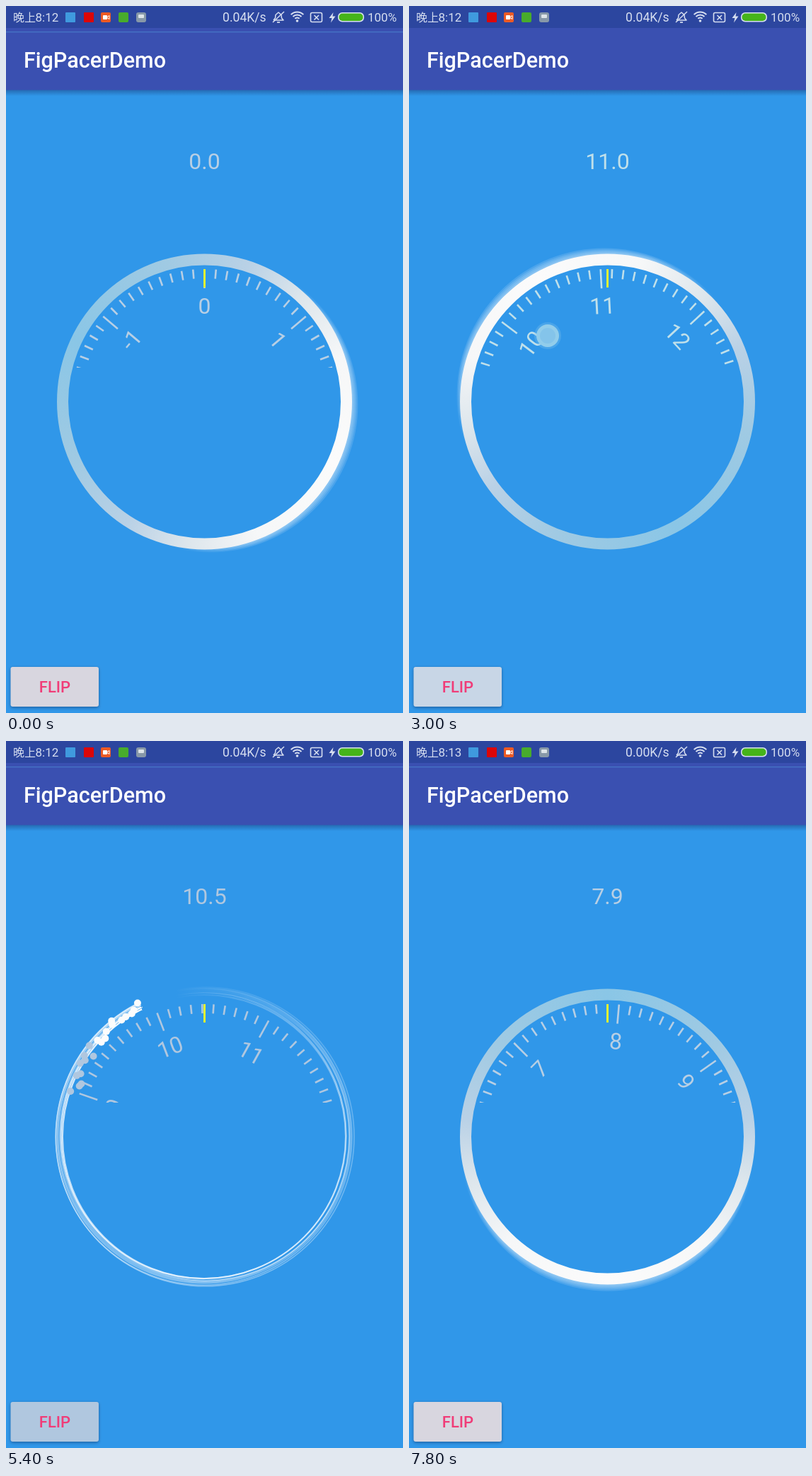
Animation, 561 px wide and 997 px high, one loop 8 s. Source, as an HTML page with a canvas:

```html
<!DOCTYPE html>
<html lang="zh">
<head>
<meta charset="utf-8">
<title>Dial</title>
<style>
html, body { margin: 0; width: 100%; height: 100%; overflow: hidden; background: #3097e9; }
canvas { display: block; width: 561px; height: 997px; }
</style>
</head>
<body>
<canvas id="stage" width="561" height="997"></canvas>
<script>
const ctx = document.getElementById('stage').getContext('2d');
const LOOP = 8000, STEP = 200;
const CX = 280.5, CY = 558, RAD = Math.PI / 180;
const ROBOTO = 'Roboto, sans-serif';
const CJK = '"Noto Sans CJK SC", "Noto Sans CJK", sans-serif';
const SPARK_START = 4700, SPARK_END = 7200;

// time, dial value
const DRAG = [[0, 0], [400, 0], [1800, 7.82], [2600, 9], [3000, 11.06],
  [4000, 21.68], [4400, 22.8], [5400, 10.42], [6200, 7.9], [LOOP, 7.9]];

function dialAt(t) {
  const i = DRAG.findIndex(k => k[0] > t);
  const [t0, v0] = DRAG[i - 1], [t1, v1] = DRAG[i];
  const value = v0 + (v1 - v0) * (t - t0) / (t1 - t0);
  // the readout trails the dial by up to a tenth
  const shown = v1 > v0 ? Math.floor(value * 10 + 1e-6) : Math.ceil(value * 10 - 1e-6);
  return { value, shown: (shown / 10).toFixed(1) };
}

function seeded(seed) {
  let s = seed * 7919 + 17;
  return () => {
    s = (s * 16807) % 2147483647;
    return s / 2147483647;
  };
}

function toneAt(t) {
  if (t >= SPARK_START && t < SPARK_END) return { ink: '#b0c7df', button: '#b0c7df' };
  if (t >= 2400 && t < SPARK_START) return { ink: '#c0e0ea', button: '#c8d6e6' };
  return { ink: '#b8cfe4', button: '#d8d6df' };
}

function text(str, x, y, size, color, align = 'left', weight = 400, family = ROBOTO) {
  ctx.font = `${weight} ${size}px ${family}`;
  ctx.fillStyle = color;
  ctx.textAlign = align;
  ctx.fillText(str, x, y);
}

function line(points, width, color) {
  ctx.beginPath();
  points.forEach(([x, y], i) => i ? ctx.lineTo(x, y) : ctx.moveTo(x, y));
  ctx.lineWidth = width;
  ctx.strokeStyle = color;
  ctx.stroke();
}

function box(x, y, w, h, r, color) {
  ctx.beginPath();
  ctx.roundRect(x, y, w, h, r);
  ctx.fillStyle = color;
  ctx.fill();
}

function dot(x, y, r, color) {
  ctx.beginPath();
  ctx.arc(x, y, r, 0, 2 * Math.PI);
  ctx.fillStyle = color;
  ctx.fill();
}

function ring(x, y, r, width, style) {
  ctx.beginPath();
  ctx.arc(x, y, r, 0, 2 * Math.PI);
  ctx.lineWidth = width;
  ctx.strokeStyle = style;
  ctx.stroke();
}

function sweep(angle, x, y, stops) {
  const g = ctx.createConicGradient(angle * RAD, x, y);
  stops.forEach(([at, color]) => g.addColorStop(at, color));
  return g;
}

const white = a => `rgba(255,255,255,${a})`;

function drawStatusIcons() {
  const pale = '#d6def0';
  box(84, 9, 14, 14, 1, '#3f9ade');
  box(110, 9, 14, 14, 1, '#dc0606');
  box(134, 9, 14, 14, 2, '#ec5a24');
  box(137, 13, 6, 6, 1, '#fff');
  line([[142, 16], [146, 13.5], [146, 18.5], [142, 16]], 1, '#fff');
  box(159, 9, 14, 14, 2, '#48ac2c');
  box(184, 9, 14, 14, 3, '#8798a8');
  box(187, 12, 8, 5, 1, '#dde4e8');

  // muted bell
  ctx.lineJoin = 'round';
  line([[378, 20], [380.5, 17], [381, 12.5], [385, 9], [389, 12.5], [389.5, 17], [392, 20], [378, 20]], 1.5, pale);
  line([[383, 23], [387, 23]], 1.7, pale);
  line([[377, 23], [393, 8]], 1.5, pale);

  // wifi
  [4.5, 8.5, 12.5].forEach(r => {
    ctx.beginPath();
    ctx.arc(411.5, 21, r, -135 * RAD, -45 * RAD);
    ctx.lineWidth = 2;
    ctx.strokeStyle = pale;
    ctx.stroke();
  });
  dot(411.5, 21, 1.8, pale);

  // no sim
  ctx.beginPath();
  ctx.roundRect(430.5, 9.5, 16, 13, 2);
  ctx.lineWidth = 1.6;
  ctx.stroke();
  line([[435.5, 13], [442, 19.5]], 1.6, pale);
  line([[442, 13], [435.5, 19.5]], 1.6, pale);

  // charging battery
  ctx.beginPath();
  [[462.5, 9], [456.5, 17], [460.5, 17], [459, 23.5], [465.5, 14.5], [461.5, 14.5]]
    .forEach(p => ctx.lineTo(...p));
  ctx.fillStyle = pale;
  ctx.fill();
  box(469, 9, 37, 13.5, 6, pale);
  box(470.5, 10.5, 34, 10.5, 5, '#46b41a');
}

function drawHeader(t) {
  const shade = ctx.createLinearGradient(0, 118, 0, 127);
  shade.addColorStop(0, 'rgba(24,60,120,.5)');
  shade.addColorStop(1, 'rgba(24,60,120,0)');
  ctx.fillStyle = shade;
  ctx.fillRect(0, 118, 561, 9);
  box(0, 0, 561, 118.5, 0, '#3a50b1');
  box(0, 0, 561, 31, 0, '#2c469f');
  if (t < 2600 || t >= 3600) box(0, 36, 561, 1.2, 0, '#4676c6');

  const pale = '#d6def0';
  text('晚上', 10, 22, 16, pale, 'left', 400, CJK);
  text(t < 7400 ? '8:12' : '8:13', 41.5, 22, 17, pale);
  text(t < 6000 ? '0.04K/s' : '0.00K/s', 306, 22, 17.6, pale);
  text('100%', 511, 22, 17, pale);
  drawStatusIcons();
  text('FigPacerDemo', 25, 87, 30.5, '#fff', 'left', 500);
}

function drawButton(color) {
  ctx.save();
  ctx.shadowColor = 'rgba(15,50,100,.55)';
  ctx.shadowBlur = 4;
  ctx.shadowOffsetY = 1.5;
  box(6.5, 932, 124.5, 56, 3, color);
  ctx.restore();
  text('FLIP', 69, 968, 22, '#f03c78', 'center', 500);
}

function drawDial(value, ink) {
  ctx.save();
  ctx.beginPath();
  ctx.rect(72, 349, 417, 161);
  ctx.clip();
  ctx.translate(CX, CY);
  for (let n = Math.ceil((value - 1.8) * 10); n <= (value + 1.8) * 10; n++) {
    const major = n % 10 === 0;
    ctx.save();
    ctx.rotate((n / 10 - value) * 50 * RAD);
    line([[0, -187], [0, major ? -160 : -174]], 2.6, ink);
    if (major) text(String(n / 10), 0, -124, 32, ink, 'center');
    ctx.restore();
  }
  ctx.restore();
  line([[CX, 371], [CX, 397]], 3, '#e2f232');
}

function drawRing(angle) {
  for (let i = 4; i > 0; i--) {
    const d = i * 2.3;
    const x = CX + d * Math.cos(angle * RAD), y = CY + d * Math.sin(angle * RAD);
    const glow = white(0.13);
    ring(x, y, 200.5, 16, sweep(angle, x, y,
      [[0, glow], [0.13, glow], [0.22, white(0)], [0.78, white(0)], [0.87, glow], [1, glow]]));
  }
  const half = [[0, '#fbfbfb'], [0.12, '#f6f7f8'], [0.2, '#dde6ec'],
    [0.27, '#b9d1e6'], [0.36, '#a0cae3'], [0.5, '#8ac6e6']];
  const back = half.slice(0, -1).reverse().map(([at, c]) => [1 - at, c]);
  ring(CX, CY, 200.5, 16, sweep(angle, CX, CY, [...half, ...back]));
}

function drawSparks(head, step) {
  const wobble = seeded(5);
  for (let i = 0; i < 8; i++) {
    const x = CX + (wobble() - 0.5) * 3, y = CY + (wobble() - 0.5) * 3;
    const k = i < 2 ? 1 : 0.62;
    ring(x, y, 200 + i * 1.55, i < 2 ? 2 : 1.6, sweep(head, x, y, [
      [0, white(0)], [0.04, white(0)], [0.15, white(0.25 * k)], [0.32, white(0.45 * k)],
      [0.6, white(0.66 * k)], [0.85, white(0.72 * k)], [1, white(k)]]));
  }
  const rnd = seeded(step);
  const count = 21;
  for (let i = count - 1; i >= 0; i--) {
    const u = i / (count - 1);
    const a = (head - 44 * u - rnd() * 2) * RAD;
    const r = 207 - 11 * u + (rnd() - 0.5) * 17;
    dot(CX + r * Math.cos(a), CY + r * Math.sin(a), 5, u < 0.55 ? '#fcfcfc' : '#b0c7df');
  }
}

function drawTouch(t) {
  if (t < 2800 || t > 3000) return;
  const p = (t - 2800) / 200;
  const x = 341 - 145 * p, y = 415 + 50 * p;
  dot(x, y, 19, 'rgba(120,190,235,.35)');
  dot(x, y, 16, '#92cdeb');
  dot(x, y, 11, '#84c4ea');
}

function draw(now) {
  const step = Math.floor((now % LOOP) / STEP), t = step * STEP;
  const tone = toneAt(t), dial = dialAt(t);
  box(0, 0, 561, 997, 0, '#3097e9');
  drawHeader(t);
  text(dial.shown, CX, 230, 32, tone.ink, 'center');
  if (t >= SPARK_START && t < SPARK_END) drawSparks(244 + 0.2114 * (t - 5400), step);
  else drawRing(t < SPARK_START ? 25 + 0.072 * t : 90 + 0.072 * (t - 7800));
  drawDial(dial.value, tone.ink);
  drawTouch(t);
  drawButton(tone.button);
}

const start = performance.now();
function tick() {
  draw(performance.now() - start);
  requestAnimationFrame(tick);
}
tick();
</script>
</body>
</html>
```
